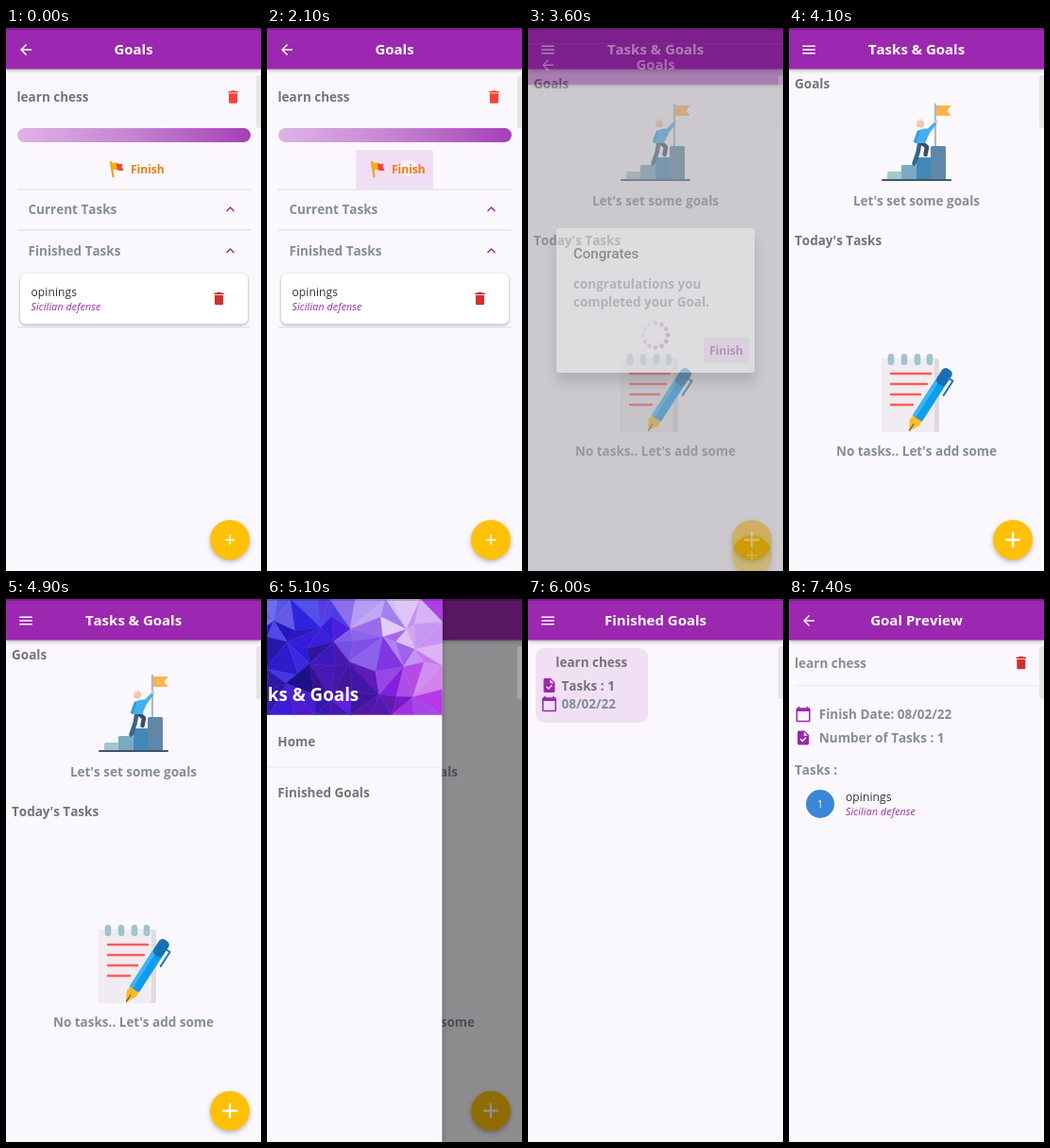
Animation of 270 by 575 pixels, one loop 7500 ms. Source, as an HTML page:

```html
<!DOCTYPE html>
<html lang="en">
<head>
<meta charset="utf-8">
<title>Tasks and goals</title>
<style>
html, body { margin: 0; width: 100%; height: 100%; overflow: hidden; background: #fbf8fd; }
svg { display: block; width: 270px; height: 575px; font-family: "Open Sans", sans-serif; font-kerning: none; }
.bar { filter: drop-shadow(0 1.5px 2px rgba(0, 0, 0, .35)); }
.card { filter: drop-shadow(0 1px 1.5px rgba(0, 0, 0, .35)); }
.fab { filter: drop-shadow(0 2.5px 2.5px rgba(0, 0, 0, .28)); }
.side { filter: drop-shadow(0 0 3px rgba(0, 0, 0, .3)); }
.modal { filter: drop-shadow(0 10px 7px rgba(0, 0, 0, .38)); }
</style>
</head>
<body>
<svg id="stage" viewBox="0 0 270 575"></svg>
<script>
const PURPLE = '#9c27b0', GREY = '#757477', SLATE = '#828e97', AMBER = '#ffc107', BG = '#fbf8fd';
const LOOP = 7500, STEP = 100;

const ICONS = {
  back: 'M20 11H7.83l5.59-5.59L12 4l-8 8 8 8 1.41-1.41L7.83 13H20v-2z',
  menu: 'M3 18h18v-2H3v2zm0-5h18v-2H3v2zm0-7v2h18V6H3z',
  trash: 'M6 19c0 1.1.9 2 2 2h8c1.1 0 2-.9 2-2V7H6v12zM19 4h-3.5l-1-1h-5l-1 1H5v2h14V4z',
  up: 'M12 8l-6 6 1.41 1.41L12 10.83l4.59 4.58L18 14z',
  add: 'M19 13h-6v6h-2v-6H5v-2h6V5h2v6h6v2z',
  task: 'M14 2H6c-1.1 0-2 .9-2 2v16c0 1.1.9 2 2 2h12c1.1 0 2-.9 2-2V8l-6-6zm-3.06 16L7.4 14.46l1.41-1.41 2.12 2.12 4.24-4.24 1.41 1.41L10.94 18zM13 9V3.5L18.5 9H13z',
  date: 'M20 3h-1V1h-2v2H7V1H5v2H4c-1.1 0-2 .9-2 2v16c0 1.1.9 2 2 2h16c1.1 0 2-.9 2-2V5c0-1.1-.9-2-2-2zm0 18H4V8h16v13z',
  home: 'M10 20v-6h4v6h5v-8h3L12 3 2 12h3v8z',
  done: 'M9 16.2L4.8 12l-1.4 1.4L9 19 21 7l-1.4-1.4z'
};

const icon = (name, x, y, fill, k = .75) =>
  `<path d="${ICONS[name]}" fill="${fill}" transform="translate(${x} ${y}) scale(${k}) translate(-12 -12)"/>`;
const text = (x, y, s, fill = GREY, size = 13.5, more = '') =>
  `<text x="${x}" y="${y}" fill="${fill}" font-size="${size}" font-weight="700" ${more}>${s}</text>`;
const mid = (x, y, s, fill, size) => text(x, y, s, fill, size, 'text-anchor="middle"');
const rect = (x, y, w, h, fill, r = 0, more = '') =>
  `<rect x="${x}" y="${y}" width="${w}" height="${h}" rx="${r}" fill="${fill}" ${more}/>`;
const circle = (x, y, r, fill, more = '') => `<circle cx="${x}" cy="${y}" r="${r}" fill="${fill}" ${more}/>`;
const path = (d, fill, more = '') => `<path d="${d}" fill="${fill}" ${more}/>`;
const line = (d, color, w) => path(d, 'none', `stroke="${color}" stroke-width="${w}" stroke-linecap="round" stroke-linejoin="round"`);
const group = (id, body) => `<g id="${id}">${body}</g>`;

const page = (title, nav, body) =>
  rect(0, 0, 270, 575, BG) + body + rect(0, 0, 270, 43.5, PURPLE, 0, 'class="bar"') +
  icon(nav, 21, 23, '#fff') + mid(135, 28, title, '#fff', 15);
const fab = k => circle(237, 542, 21, AMBER, 'class="fab"') + icon('add', 237, 542, '#fff', k);
const task = (x, y) =>
  text(x, y, 'opinings', '#333', 12, 'style="font-weight:400;letter-spacing:.1px"') +
  text(x, y + 15.3, 'Sicilian defense', PURPLE, 10.5, 'style="font-weight:400;font-style:italic;letter-spacing:.19px"');

const flag =
  line('M111 142L113.5 157.5', '#ff9800', 2) +
  path('M111.5 143.5q3.5-2 6.5 0l1 7q-3-1.500-6.500 .5z', '#ffb300') +
  path('M117 143q3 2 6.500 .5l-1 3.500 2 3.500q-4 1.500-7-.5z', '#f44336');

const goalBody =
  text(11.5, 78, 'learn chess') + icon('trash', 240.5, 73, '#f44336') +
  rect(12, 106, 247, 15, 'url(#progress)', 7.5) +
  group('press', rect(94, 129, 82, 42, 'rgba(156,39,176,.12)', 3) + circle(150, 148, 9, 'rgba(255,255,255,.55)')) +
  flag + text(132, 154, 'Finish', '#f57c0a', 12) +
  [171, 214, 317].map(y => rect(12, y - .5, 247, 1, '#dcdadd')).join('') +
  text(23.5, 197, 'Current Tasks', SLATE) + icon('up', 237.5, 192, PURPLE) +
  text(23.5, 241, 'Finished Tasks', SLATE) + icon('up', 237.5, 236, PURPLE) +
  rect(15, 260, 241, 53.5, '#fff', 6, 'class="card"') +
  task(26.5, 283.5) + icon('trash', 225.5, 286.5, '#d32f2f');

const climber =
  [[104, 152, '#a3c6cf'], [119, 145, '#79abc0'], [135, 137, '#4189b8'], [150, 125, '#5f87a8']]
    .map(([x, y, c]) => rect(x, y, 16, 161 - y, c, 1.5)).join('') +
  rect(98, 160, 74, 2, '#44546a', 1) +
  rect(153.8, 80, 2.2, 45, '#a9bcc6') +
  path('M156 82H171.500L167.500 87.500 171.500 93H156z', '#ffb450') +
  line('M138.5 121L136.500 132 132.500 143.500', '#3a6488', 4.5) +
  line('M140 121L146 126 144.500 134', '#34506c', 4.5) +
  path('M133.500 122L136 110Q139 106 147 106.500L154 99.500 156.500 101.500 149 111 144 122z', '#45b0ee') +
  line('M137 110L133.500 120', '#2f9ee0', 3) +
  circle(155.5, 99, 1.8, '#f6bd9a') + circle(139, 101.5, 4, '#f6c3a3') +
  path('M135 101q0-5 5-4.500l2 1.500q-4 0-5 4z', '#e8dcd4');

const notes =
  rect(98, 350, 61, 78, '#dfdae0', 3) + rect(98, 350, 56, 78, '#f0ecf1', 3) +
  [108, 122, 136, 149].map(x => rect(x - 3.3, 345, 6.6, 12, '#a0c3cc', 3.2)).join('') +
  [44, 40, 33, 25].map((w, i) => line(`M108 ${366 + 11 * i}h${w - 2}`, '#fa5c58', 2.4)).join('') +
  `<g transform="translate(127 427) rotate(33)">` +
  path('M0 0L-6-11 -5-18H5L6-11z', '#fbbc22') + line('M0-1V-9', '#6b5a26', 1.2) +
  rect(-6, -62, 12, 46, '#0d9cf0', 1) + rect(-6, -62, 4, 46, '#3cb6f6', 1) +
  rect(-6, -78, 12, 19, '#1671b4', 4.5) + line('M5-70H10V-52', '#1c78bc', 2) + '</g>';

const homeBody =
  text(6, 64, 'Goals') + climber + mid(135, 187.5, "Let's set some goals", SLATE) +
  text(6, 229.5, "Today's Tasks") + notes + mid(135, 453, "No tasks.. Let's add some", SLATE);

// Faceted drawer header on a jittered grid
function facets() {
  const W = 228, H = 122.5, nx = 10, ny = 5;
  const rnd = n => { const v = Math.sin(n * 127.1 + 11.7) * 43758.5453; return v - Math.floor(v); };
  const spot = (u, v, x, y, r) => Math.exp(-((u - x) ** 2 + ((v - y) * .55) ** 2) / (r * r));
  const at = (i, j) => {
    const n = i * 7 + j, sx = i % nx ? .75 : 0, sy = j % ny ? .75 : 0;
    return [(i + (rnd(n) - .5) * sx) * W / nx, (j + (rnd(n + 90) - .5) * sy) * H / ny];
  };
  let out = '', seed = 200;
  const tri = (...p) => {
    const u = (p[0][0] + p[1][0] + p[2][0]) / 3 / W, v = (p[0][1] + p[1][1] + p[2][1]) / 3 / H;
    const hue = 238 + 40 * u * u + 10 * v + 12 * (rnd(seed++) - .5);
    const glow = 36 * spot(u, v, .72, 0, .26) + 20 * spot(u, v, .95, .5, .2) + 24 * spot(u, v, .15, 0, .15);
    const light = 48 + glow - 12 * spot(u, v, .5, .7, .22) + 22 * (rnd(seed++) - .5);
    const c = `hsl(${hue.toFixed(0)} 76% ${Math.min(95, light).toFixed(0)}%)`;
    out += path('M' + p.map(q => q.map(n => n.toFixed(1)).join(' ')).join('L') + 'z', c, `stroke="${c}" stroke-width=".5"`);
  };
  for (let i = 0; i < nx; i++) for (let j = 0; j < ny; j++) {
    const a = at(i, j), b = at(i + 1, j), c = at(i + 1, j + 1), d = at(i, j + 1);
    if ((i + j) % 2) { tri(a, b, c); tri(a, c, d); } else { tri(a, b, d); tri(b, c, d); }
  }
  return out;
}

const drawer =
  rect(0, 0, 228, 575, BG, 0, 'class="side"') + facets() +
  text(12, 108, 'Tasks &amp; Goals', '#fff', 18.75) + rect(0, 177.5, 228, 1, '#ebe9ed') +
  group('pick', rect(0, 179, 228, 53, 'rgba(0,0,0,.07)')) +
  icon('home', 21, 151, GREY) + text(54, 156, 'Home') +
  icon('done', 21, 205, GREY) + text(54, 210, 'Finished Goals');

const doneBody =
  rect(8, 52, 119, 79, '#f1e0f4', 9) + group('tap', rect(8, 52, 119, 79, 'rgba(156,39,176,.1)', 9)) +
  mid(67.3, 71.5, 'learn chess') +
  icon('task', 22.5, 91.5, PURPLE) + text(35.5, 96.5, 'Tasks : 1') +
  icon('date', 22.5, 111, PURPLE) + text(35.5, 115.8, '08/02/22', SLATE);

const previewBody =
  text(6, 72.5, 'learn chess', SLATE) + icon('trash', 245.8, 67.5, '#d32f2f') +
  rect(6, 91, 258, 1, '#ebe9ed') +
  icon('date', 15, 122, PURPLE) + text(31.8, 127, 'Finish Date: 08/02/22', SLATE) +
  icon('task', 15, 147, PURPLE) + text(31.8, 152, 'Number of Tasks : 1', SLATE) +
  text(6, 186, 'Tasks :', SLATE) +
  circle(33, 217, 15, '#3a87d6') + text(33, 221, '1', '#fff', 10.5, 'text-anchor="middle" style="font-weight:400"') +
  task(60, 214);

const dots = Array.from({ length: 12 }, (_, i) => {
  const a = i * Math.PI / 6;
  return circle((135 + 13 * Math.cos(a)).toFixed(2), (309 + 13 * Math.sin(a)).toFixed(2), 2.3, PURPLE, 'class="dot"');
}).join('');

const dialog =
  rect(30, 212, 210, 153, '#fff', 3, 'class="modal"') +
  text(48, 244, 'Congrates', '#212121', 15, 'style="font-family:Roboto,sans-serif;font-weight:500"') +
  text(48, 276, 'congratulations you', SLATE) + text(48, 295, 'completed your Goal.', SLATE) +
  group('ok', rect(186, 327, 48, 28, 'rgba(156,39,176,.14)', 3)) + text(192, 346, 'Finish', PURPLE, 12);

document.getElementById('stage').innerHTML =
  `<defs><linearGradient id="progress"><stop offset="0" stop-color="#deb3e6"/><stop offset=".5" stop-color="#c583d1"/><stop offset="1" stop-color="#a63fb8"/></linearGradient></defs>` +
  group('home', page('Tasks &amp; Goals', 'menu', homeBody + fab(1.14))) +
  group('shade', rect(0, 0, 270, 575, '#000')) + group('drawer', drawer) +
  group('done', page('Finished Goals', 'menu', doneBody)) +
  group('preview', page('Goal Preview', 'back', previewBody)) +
  group('goal', page('Goals', 'back', group('detail', goalBody) + group('spin', dots) + fab(.75))) +
  group('scrim', rect(0, 0, 270, 575, '#000')) + group('dialog', dialog) +
  rect(0, 0, 270, 2, 'rgba(0,0,0,.2)') + rect(265, 50, 8, 56, 'rgba(200,200,200,.42)', 3);

const el = {};
document.querySelectorAll('g[id]').forEach(g => el[g.id] = g);
const spinDots = [...document.querySelectorAll('.dot')];

const clamp = v => Math.max(0, Math.min(1, v));
const ramp = (t, from, ms) => clamp((t - from) / ms);
function bezier(x1, y1, x2, y2) {
  const f = (a, b, s) => 3 * a * s * (1 - s) ** 2 + 3 * b * s * s * (1 - s) + s ** 3;
  return x => {
    let lo = 0, hi = 1;
    for (let i = 0; i < 24; i++) { const m = (lo + hi) / 2; f(x1, x2, m) < x ? lo = m : hi = m; }
    return f(y1, y2, lo);
  };
}
const slide = bezier(.4, 0, .2, 1), fade = bezier(.42, 0, 1, 1), out = bezier(0, 0, .58, 1);

function show(id, a) {
  el[id].style.display = a > 0 ? '' : 'none';
  el[id].setAttribute('opacity', a);
}
const move = (id, x, y) => el[id].setAttribute('transform', `translate(${x} ${y})`);
// Pages rise a quarter of the stage while fading in
function route(id, v) {
  show(id, fade(v));
  move(id, 0, 143.75 * (1 - slide(v)));
}
const during = (t, a, b) => t >= a && t < b ? 1 : 0;

function draw(t) {
  route('goal', 1 - ramp(t, 3484, 300));
  show('press', during(t, 2100, 2400) || .5 * during(t, 2400, 2500));
  const busy = t >= 3500;
  show('detail', busy ? 0 : 1);
  show('spin', busy ? 1 : 0);
  const turn = (t - 3600) / 1200 * 2 * Math.PI + .4;
  spinDots.forEach((d, i) => d.setAttribute('opacity', (.6 + .4 * Math.cos(i * Math.PI / 6 - turn)).toFixed(2)));

  const v = out(ramp(t, 2110, 150)) * out(1 - ramp(t, 3485, 150));
  show('scrim', .54 * v);
  show('dialog', v);
  show('ok', during(t, 3300, 3700));

  const open = ramp(t, 4900, 246);
  show('shade', .54 * open);
  show('drawer', open ? 1 : 0);
  move('drawer', -228 * (1 - open), 0);
  show('pick', during(t, 5500, 6000));

  route('done', ramp(t, 5650, 300));
  show('tap', during(t, 6900, 7300));
  route('preview', ramp(t, 6980, 300));
}

const start = performance.now();
function tick() {
  const t = (performance.now() - start) % LOOP;
  draw(Math.floor(t / STEP) * STEP);
  requestAnimationFrame(tick);
}
tick();
</script>
</body>
</html>
```
